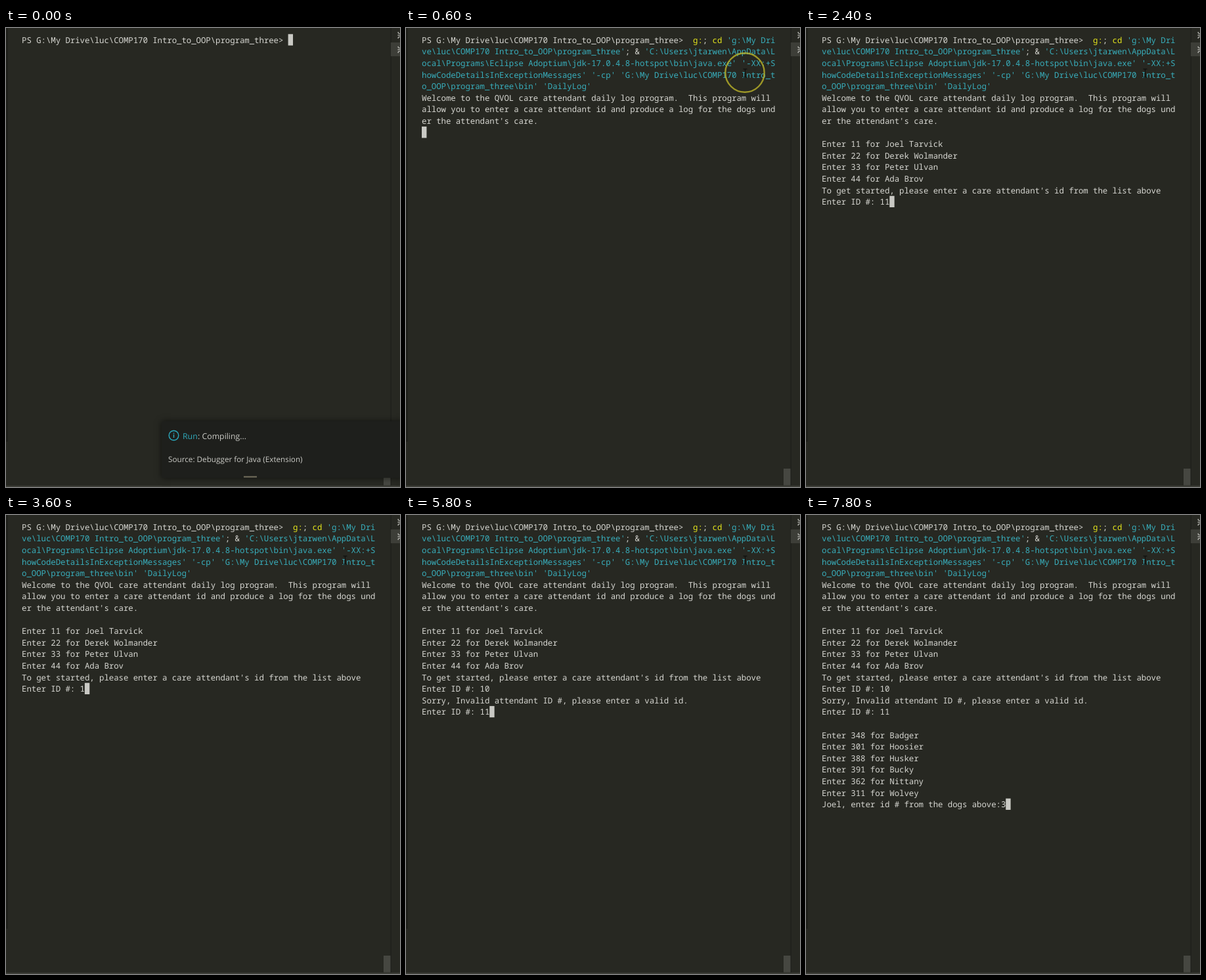
These frames come from a looping animation (600x699 px, 8 s). An HTML page with a canvas:

```html
<!DOCTYPE html>
<html lang="en">
<head>
<meta charset="utf-8">
<title>Terminal session</title>
<style>
  html, body { margin: 0; width: 100%; height: 100%; overflow: hidden; background: #272822; }
  canvas { display: block; }
</style>
</head>
<body>
<canvas id="stage" width="600" height="699"></canvas>
<script>
const ctx = document.getElementById('stage').getContext('2d');
const LOOP = 8000;
const COLS = 73, CELL_W = 7.375, ROW_H = 17.6, LEFT = 24, TOP = 9.3, BASELINE = 13.4;
const WHITE = '#d6d6d1', YELLOW = '#e6e61c', CYAN = '#38adbb';
const MONO = '500 12.4px "Noto Sans Mono", monospace';
const SANS = '"Open Sans", sans-serif';

// Terminal output: time, then pairs of colour and text. '\b' erases one cell.
const output = [
  [0, WHITE, 'PS G:\\My Drive\\luc\\COMP170 Intro_to_OOP\\program_three> '],
  [400, YELLOW, ' g:', WHITE, '; ', YELLOW, 'cd ',
    CYAN, "'g:\\My Drive\\luc\\COMP170 Intro_to_OOP\\program_three'", WHITE, '; & ',
    CYAN, "'C:\\Users\\jtarwen\\AppData\\Local\\Programs\\Eclipse Adoptium\\jdk-17.0.4.8-hotspot\\bin\\java.exe' "
      + "'-XX:+ShowCodeDetailsInExceptionMessages' '-cp' "
      + "'G:\\My Drive\\luc\\COMP170 Intro_to_OOP\\program_three\\bin' 'DailyLog'\n"],
  [600, WHITE, 'Welcome to the QVOL care attendant daily log program.  This program will '
    + "allow you to enter a care attendant id and produce a log for the dogs under the attendant's care.\n"],
  [800, WHITE, '\nEnter 11 for Joel Tarvick\nEnter 22 for Derek Wolmander\n'
    + 'Enter 33 for Peter Ulvan\nEnter 44 for Ada Brov\n'
    + "To get started, please enter a care attendant's id from the list above\nEnter ID #: "],
  [2200, WHITE, '1'],
  [2400, WHITE, '1'],
  [3600, WHITE, '\b'],
  [4000, WHITE, '0'],
  [4400, WHITE, '\nSorry, Invalid attendant ID #, please enter a valid id.\nEnter ID #: '],
  [5600, WHITE, '1'],
  [5800, WHITE, '1'],
  [6000, WHITE, '\n\nEnter 348 for Badger\nEnter 301 for Hoosier\nEnter 388 for Husker\n'
    + 'Enter 391 for Bucky\nEnter 362 for Nittany\nEnter 311 for Wolvey\n'
    + 'Joel, enter id # from the dogs above:'],
  [7800, WHITE, '3']
];

function rect(x, y, w, h, color) {
  ctx.fillStyle = color;
  ctx.fillRect(x, y, w, h);
}

function line(color, width, ...points) {
  ctx.strokeStyle = color;
  ctx.lineWidth = width;
  ctx.beginPath();
  for (const [x, y] of points) ctx.lineTo(x, y);
  ctx.stroke();
}

function circle(x, y, r, color, width) {
  ctx.strokeStyle = color;
  ctx.lineWidth = width;
  ctx.beginPath();
  ctx.arc(x, y, r, 0, Math.PI * 2);
  ctx.stroke();
}

function label(text, x, y, size, color) {
  ctx.font = `${size}px ${SANS}`;
  ctx.fillStyle = color;
  ctx.fillText(text, x, y);
}

function layout(time) {
  const cells = [];
  let col = 0, row = 0;
  for (const [start, ...runs] of output) {
    if (start > time) break;
    for (let i = 0; i < runs.length; i += 2) {
      for (const char of runs[i + 1]) {
        if (char === '\n') { col = 0; row++; continue; }
        if (char === '\b') { cells.pop(); col--; continue; }
        cells.push({ char, col, row, color: runs[i] });
        if (++col === COLS) { col = 0; row++; }
      }
    }
  }
  return { cells, col, row };
}

function drawTerminal(time) {
  const { cells, col, row } = layout(time);
  ctx.font = MONO;
  for (const cell of cells) {
    ctx.fillStyle = cell.color;
    ctx.fillText(cell.char, LEFT + cell.col * CELL_W, TOP + cell.row * ROW_H + BASELINE);
  }
  rect(LEFT + col * CELL_W, TOP + row * ROW_H, 7.4, ROW_H - 0.3, '#c9c9c4');
}

function drawFrame() {
  rect(0, 0, 600, 699, '#272822');
  rect(0, 0, 3, 630, '#1f201b');
  rect(585.5, 0, 1.2, 697, '#1e1f1b');
  rect(586, 22, 14, 21, '#3d3e38');
  // Left half of a bug-shaped tab icon, cut by the stage edge.
  for (const y of [11, 33]) {
    line('#c5c5c0', 1.2, [597, y - 5], [597.5, y - 3], [600, y - 2.5]);
    line('#c5c5c0', 1.2, [596.5, y], [600, y]);
    line('#c5c5c0', 1.2, [597, y + 5], [597.5, y + 3], [600, y + 2.5]);
  }
  rect(575, 671, 10.5, 25.5, '#464741');
  rect(0, 697, 600, 2, '#3c3d37');
}

function drawNotification() {
  ctx.save();
  ctx.shadowColor = 'rgba(0,0,0,.6)';
  ctx.shadowBlur = 9;
  rect(237, 599, 370, 86, '#1e1f1c');
  ctx.restore();
  circle(255.5, 620.5, 7.3, '#2ba9bd', 1.4);
  rect(254.8, 619, 1.4, 5, '#2ba9bd');
  rect(254.8, 616.5, 1.4, 1.5, '#2ba9bd');
  label('Run', 269, 626, 12.3, '#2fa9bb');
  label(': Compiling...', 292, 626, 12.3, '#cacac5');
  label('Source: Debugger for Java (Extension)', 247, 661, 11.73, '#cacac5');
  rect(362, 682.5, 20, 2, '#75715e');
}

function drawPointer(time) {
  line('#10110e', 1.3, [513.5, 62.5], [519.5, 62.5]);
  line('#10110e', 1.3, [516.5, 62.5], [516.5, 75]);
  line('#10110e', 1.3, [513.5, 75], [519.5, 75]);
  if (time >= 1000) return;
  ctx.globalAlpha = time < 600 ? 1 : time < 800 ? 0.75 : 0.35;
  circle(516, 68, 29.7, '#c5bd29', 2.4);
  ctx.globalAlpha = 1;
}

function draw() {
  const time = performance.now() % LOOP;
  ctx.textRendering = 'geometricPrecision';
  drawFrame();
  drawTerminal(time);
  if (time < 200) drawNotification();
  else drawPointer(time);
  requestAnimationFrame(draw);
}

draw();
</script>
</body>
</html>
```
